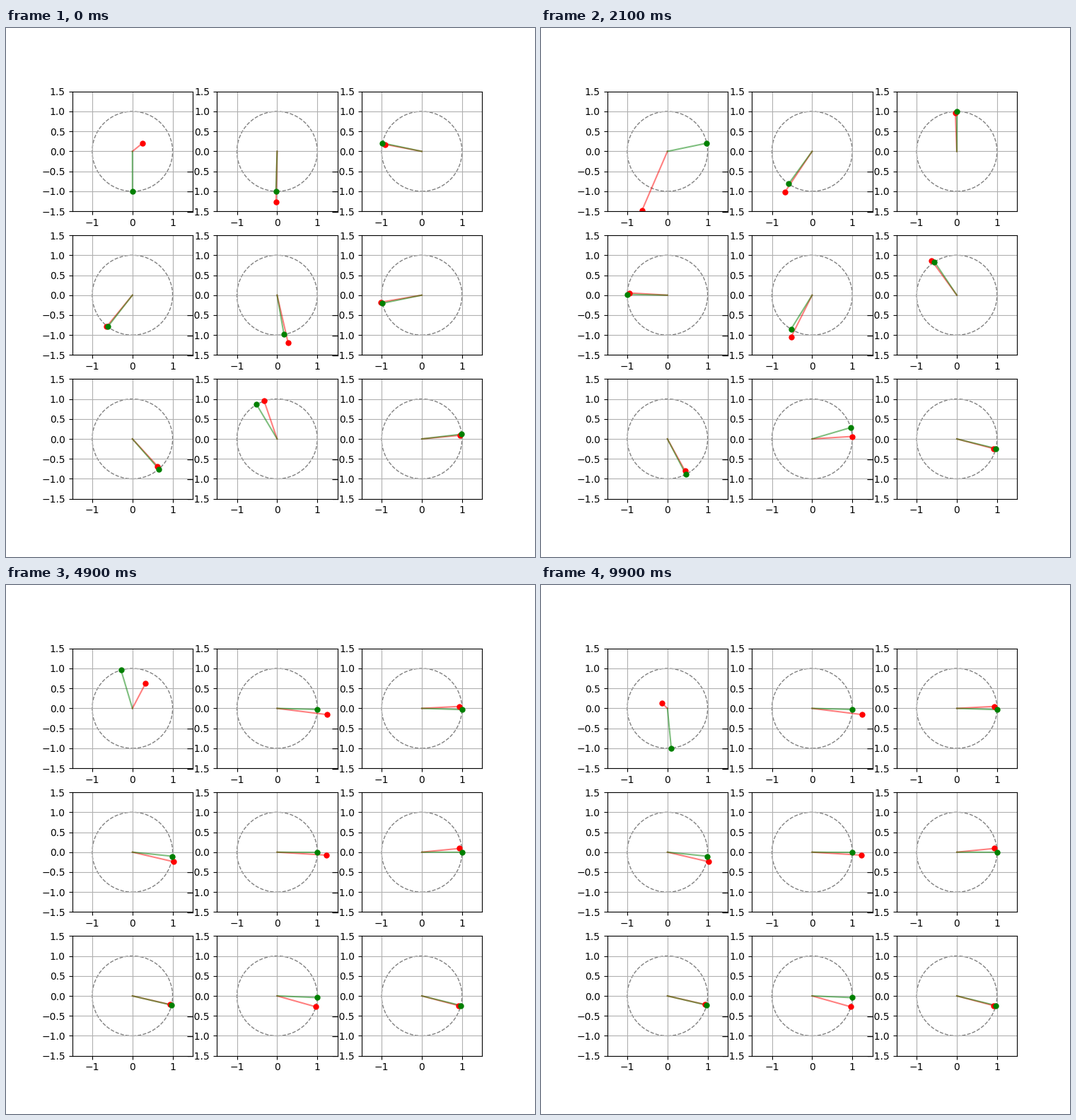
Recreate the animation shown at these times as a matplotlib script. Size 748x748 px, loop 10000 ms.

```python
import numpy as np
import matplotlib.pyplot as plt
from matplotlib.animation import FuncAnimation

FRAMES, INTERVAL = 100, 100


def turn(deg, r=1.0):
    """Complex number at an angle in degrees."""
    return r * np.exp(1j * np.radians(deg))


def glide(t, keys):
    """Cubic Hermite curve through timed complex points."""
    ts, ps = np.array(list(keys), float), np.array(list(keys.values()))
    m = np.gradient(ps, ts)
    i = min(np.searchsorted(ts, t, side="right") - 1, len(ts) - 2)
    h = ts[i + 1] - ts[i]
    u = (t - ts[i]) / h
    return ((1 + 2 * u) * (1 - u) ** 2 * ps[i] + u * (1 - u) ** 2 * h * m[i]
            + u * u * (3 - 2 * u) * ps[i + 1] + u * u * (u - 1) * h * m[i + 1])


def wander():
    """Slow phase that changes rate at zero, with a free-roaming estimate."""
    keys = {0: .25 + .205j, 14: -.73 - 1.21j, 29: -.25 - 1.45j,
            40: .34 - .87j, 55: -.1 + .93j, 60: -.8 + .09j,
            70: -.45 - .76j, 81: -.13 - .57j, 99: -.13 + .125j}

    def pose(t):
        x = t - 17.5
        return glide(t, keys), turn(x * (5.14 if x < 0 else 3.38))
    return pose


def spin(start, rate, gain, lead, centre):
    """Steady phase that halts on its last step before zero.

    The estimate runs on a circle that is scaled, rotated and off centre.
    """
    last = int(-start / rate)

    def pose(t):
        green = turn(start + rate * min(t, last))
        return centre + turn(lead, gain) * green, green
    return pose


POSES = [
    wander(),
    spin(-451.7, 15.52, 1.19, -2, .05 - .08j),
    spin(-552, 13.42, .93, 3, .01 + .03j),
    spin(-487.7, 14.6, 1.0, -5, .04 - .05j),
    spin(-440.2, 15.17, 1.14, 0, .08 - .07j),
    spin(-528.3, 13.9, .99, 2, -.05 + .06j),
    spin(-409, 16.49, .92, -3, .06 + .04j),
    spin(-599.3, 12.18, 1.01, -13, -.02),
    spin(-353.2, 17.86, .94, -2.5, .02 + .02j),
]

fig, axes = plt.subplots(3, 3, figsize=(7.48, 7.48), dpi=100)
arms = []
for ax in axes.flat:
    ax.set(xlim=(-1.5, 1.5), ylim=(-1.5, 1.5),
           xticks=[-1, 0, 1], yticks=np.arange(-1.5, 1.6, 0.5))
    ax.grid(True)
    ax.add_patch(plt.Circle((0, 0), 1, fill=False, color="gray", ls="--"))
    lines = [ax.plot([], [], c, alpha=0.5)[0] for c in ("r-", "g-")]
    dots = [ax.plot([], [], c, ms=5)[0] for c in ("ro", "go")]
    arms.append(list(zip(lines, dots)))


def update(frame):
    for pose, pair in zip(POSES, arms):
        for (line, dot), tip in zip(pair, pose(frame)):
            line.set_data([0, tip.real], [0, tip.imag])
            dot.set_data([tip.real], [tip.imag])
    return [artist for pair in arms for arm in pair for artist in arm]


anim = FuncAnimation(fig, update, frames=FRAMES, interval=INTERVAL,
                     repeat=True, repeat_delay=0)
plt.show()
```
